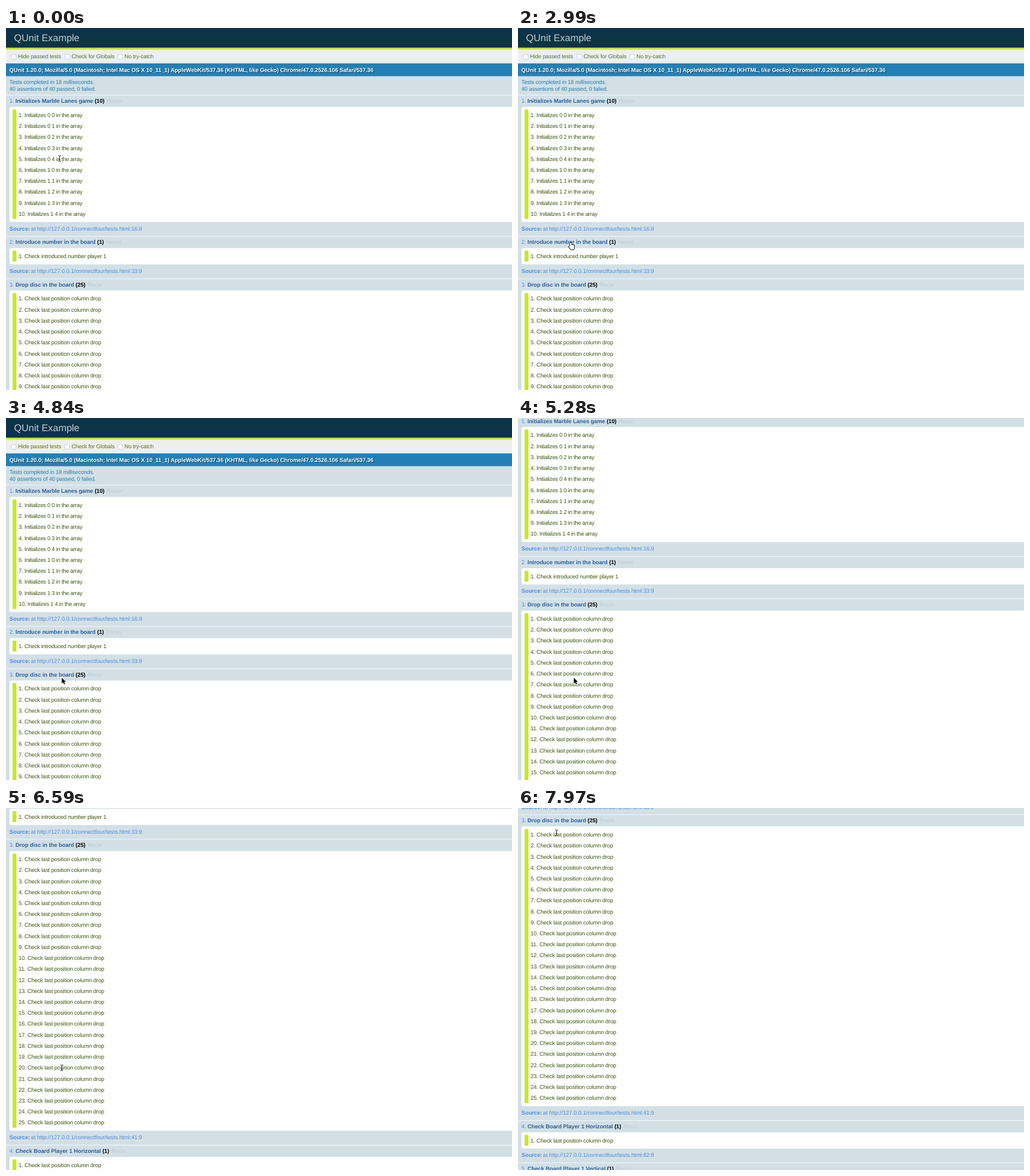
Write an HTML page with a canvas that moves like this. It is 884 px wide and 634 px high and loops after 8 s.

```html
<!DOCTYPE html>
<html lang="en">
<head>
<meta charset="utf-8">
<title>QUnit Example</title>
<style>
  html, body { margin: 0; width: 100%; height: 100%; overflow: hidden; background: #d2e0e6; }
  canvas { display: block; width: 884px; height: 634px; }
</style>
</head>
<body>
<canvas id="stage" width="884" height="634"></canvas>
<script>
const W = 884, H = 634, LOOP = 8000;
const ctx = document.getElementById('stage').getContext('2d');
const FONT = '"Liberation Sans", Arial, sans-serif';
const SIZE = 9.8, ROW = 19.22, CLOSED = 20.5, LIST_TOP = 117.2;
const TRACK = -0.16, BOLD_TRACK = -0.07;
const LIME = '#c6e72f', BLUE = '#2480b4', LINK = '#4f8be2', PALE = '#d2e0e6';

const drop = () => 'Check last position column drop';
const cell = i => `Initializes ${Math.floor(i / 5)} ${i % 5} in the array`;
const tests = [
  { name: 'Initializes Marble Lanes game', count: 10, row: cell, at: '16:9', space: -0.26 },
  { name: 'Introduce number in the board', count: 1, row: () => 'Check introduced number player 1', at: '33:9', space: -0.21 },
  { name: 'Drop disc in the board', count: 25, row: drop, at: '41:9' },
  { name: 'Check Board Player 1 Horizontal', count: 1, row: drop, at: '82:8' },
  { name: 'Check Board Player 1 Vertical', count: 1, row: drop, at: '95:8' }
];

// Each move reaches its pose in n equal steps, the first at `from`, the last at `to`
const start = { x: 93.5, y: 228.5, scroll: 0, shape: beam };
const moves = [
  { from: 300, to: 960, n: 5, x: 97.5, y: 130, shape: hand },
  { from: 2040, to: 2400, n: 3, x: 98.5, y: 321, shape: beam },
  { from: 2690, to: 2990, n: 3, x: 92, y: 376, shape: hand },
  { from: 3740, to: 3900, n: 2, x: 93.5, y: 386 },
  { from: 4060, to: 4220, n: 2, x: 93, y: 376 },
  { from: 4675, to: 4840, n: 2, x: 97.5, y: 455, shape: arrow },
  { from: 5130, to: 5280, n: 2, scroll: 122.5 },
  { from: 5520, to: 5760, n: 2, scroll: 245, shape: beam },
  { from: 6110, to: 6590, n: 3, scroll: 384.3 },
  { from: 6820, to: 7060, n: 2, scroll: 427.4 },
  { from: 7300, to: 7970, n: 5, x: 67.5, y: 43.5 }
];

function poseAt(t) {
  let pose = start;
  for (const m of moves) {
    if (t < m.from) break;
    const next = { ...pose, ...m };
    const step = Math.min(m.n, 1 + Math.floor((t - m.from) / (m.to - m.from) * (m.n - 1)));
    const mix = key => pose[key] + (next[key] - pose[key]) * step / m.n;
    const arrived = step === m.n || pose.shape === hand;
    pose = { x: mix('x'), y: mix('y'), scroll: mix('scroll'), shape: arrived ? next.shape : pose.shape };
  }
  return pose;
}

function rect(x, y, w, h, color) {
  ctx.fillStyle = color;
  ctx.fillRect(x, y, w, h);
}

function text(str, x, y, color, { bold = false, size = SIZE, space = bold ? BOLD_TRACK : TRACK } = {}) {
  ctx.font = `${bold ? 'bold ' : ''}${size}px ${FONT}`;
  ctx.letterSpacing = space + 'px';
  ctx.fillStyle = color;
  ctx.fillText(str, x, y);
  return x + ctx.measureText(str).width;
}

function checkbox(x, label) {
  ctx.beginPath();
  ctx.roundRect(x + 0.5, 46.5, 8, 8, 1.5);
  ctx.fillStyle = '#fff';
  ctx.fill();
  ctx.strokeStyle = '#c4c4c4';
  ctx.lineWidth = 0.8;
  ctx.stroke();
  text(label, x + 12, 53, '#5e740b');
}

function banner() {
  // Bands overlap from the lowest edge up
  rect(0, 0, W, 84.4, BLUE);
  rect(0, 0, W, 62, '#eee');
  rect(0, 0, W, 37.7, LIME);
  rect(0, 0, W, 34.4, '#0d3349');
  text('QUnit Example', 14, 23, '#c2ccd1', { size: 17, space: 0 });
  checkbox(9, 'Hide passed tests');
  checkbox(102.5, 'Check for Globals');
  checkbox(195, 'No try-catch');
  ctx.save();
  ctx.shadowColor = 'rgba(0,0,0,.5)';
  ctx.shadowOffsetX = ctx.shadowOffsetY = 1.3;
  ctx.shadowBlur = 0.6;
  text('QUnit 1.20.0; Mozilla/5.0 (Macintosh; Intel Mac OS X 10_11_1) AppleWebKit/537.36 ' +
    '(KHTML, like Gecko) Chrome/47.0.2526.106 Safari/537.36', 6, 77, '#fff', { bold: true });
  ctx.restore();
  text('Tests completed in 18 milliseconds.', 6, 98, BLUE);
  text('40 assertions of 40 passed, 0 failed.', 6, 110, BLUE);
}

// Draws one test and returns its height
function drawTest({ name, count, row, at, space }, index, top, closed) {
  const inner = count * ROW, height = closed ? CLOSED : 55.07 + inner;
  rect(0, top, W, 0.8, '#fff');
  text(`${index + 1}.`, 6, top + 14, LINK);
  let x = text(name, 16.5, top + 14, '#2f5f9a', { bold: true });
  x = text(`(${count})`, x + 2.7, top + 14, '#000', { bold: true });
  text('Rerun', x + 4, top + 14, '#bccbd3');
  if (closed) return height;

  ctx.beginPath();
  ctx.roundRect(6, top + 21, W, inner + 9.4, 3.5);
  ctx.fillStyle = '#fff';
  ctx.fill();
  rect(11.4, top + 25.5, 6.8, inner - 0.3, LIME);
  for (let i = 0; i < count; i++) {
    const y = top + 38.7 + i * ROW;
    text(`${i + 1}.`, 22, y, '#40550f');
    text(row(i), i < 9 ? 32.3 : 37.6, y, '#40550f', { space });
  }
  const y = top + height - 9.8;
  text('Source:', 6, y, LINK, { bold: true });
  text(`at http://127.0.0.1/connectfour/tests.html:${at}`, 43.5, y, LINK, { space: -0.05 });
  return height;
}

function hand() {
  ctx.beginPath();
  ctx.roundRect(-1.3, 0, 2.6, 8, 1.3);
  ctx.roundRect(-1, 4, 7.2, 8, 2.2);
  ctx.roundRect(-3.2, 6.4, 4, 2.4, 1.2);
  ctx.strokeStyle = '#111';
  ctx.lineWidth = 1.8;
  ctx.stroke();
  ctx.fillStyle = '#fff';
  ctx.fill();
}

function arrow() {
  ctx.beginPath();
  for (const [x, y] of [[0, 0], [0, 10], [2.3, 8], [4, 11.6], [5.6, 10.9], [4, 7.3], [7, 7.1]]) ctx.lineTo(x, y);
  ctx.closePath();
  ctx.strokeStyle = '#fff';
  ctx.lineWidth = 1.6;
  ctx.stroke();
  ctx.fillStyle = '#000';
  ctx.fill();
}

function beam() {
  ctx.beginPath();
  ctx.moveTo(0, -4.2);
  ctx.lineTo(0, 4.2);
  for (const s of [-1, 1]) {
    ctx.moveTo(-2.4, 5 * s);
    ctx.quadraticCurveTo(0, 5 * s, 0, 4 * s);
    ctx.quadraticCurveTo(0, 5 * s, 2.4, 5 * s);
  }
  ctx.moveTo(-1.3, 1.8);
  ctx.lineTo(1.3, 1.8);
  for (const [color, width] of [['rgba(255,255,255,.7)', 2.2], ['#111', 1]]) {
    ctx.strokeStyle = color;
    ctx.lineWidth = width;
    ctx.stroke();
  }
}

function draw(t) {
  const { x, y, scroll, shape } = poseAt(t);
  const closed = [t >= 1260 && t < 1860, t >= 3440 && t < 4510];

  ctx.textRendering = 'geometricPrecision';
  rect(0, 0, W, H, PALE);
  ctx.save();
  ctx.translate(0, -scroll);
  banner();
  let top = LIST_TOP;
  tests.forEach((test, i) => { top += drawTest(test, i, top, closed[i]); });
  ctx.restore();

  ctx.save();
  ctx.translate(x, y);
  shape();
  ctx.restore();
}

function frame() {
  draw(performance.now() % LOOP);
  requestAnimationFrame(frame);
}
frame();
</script>
</body>
</html>
```
